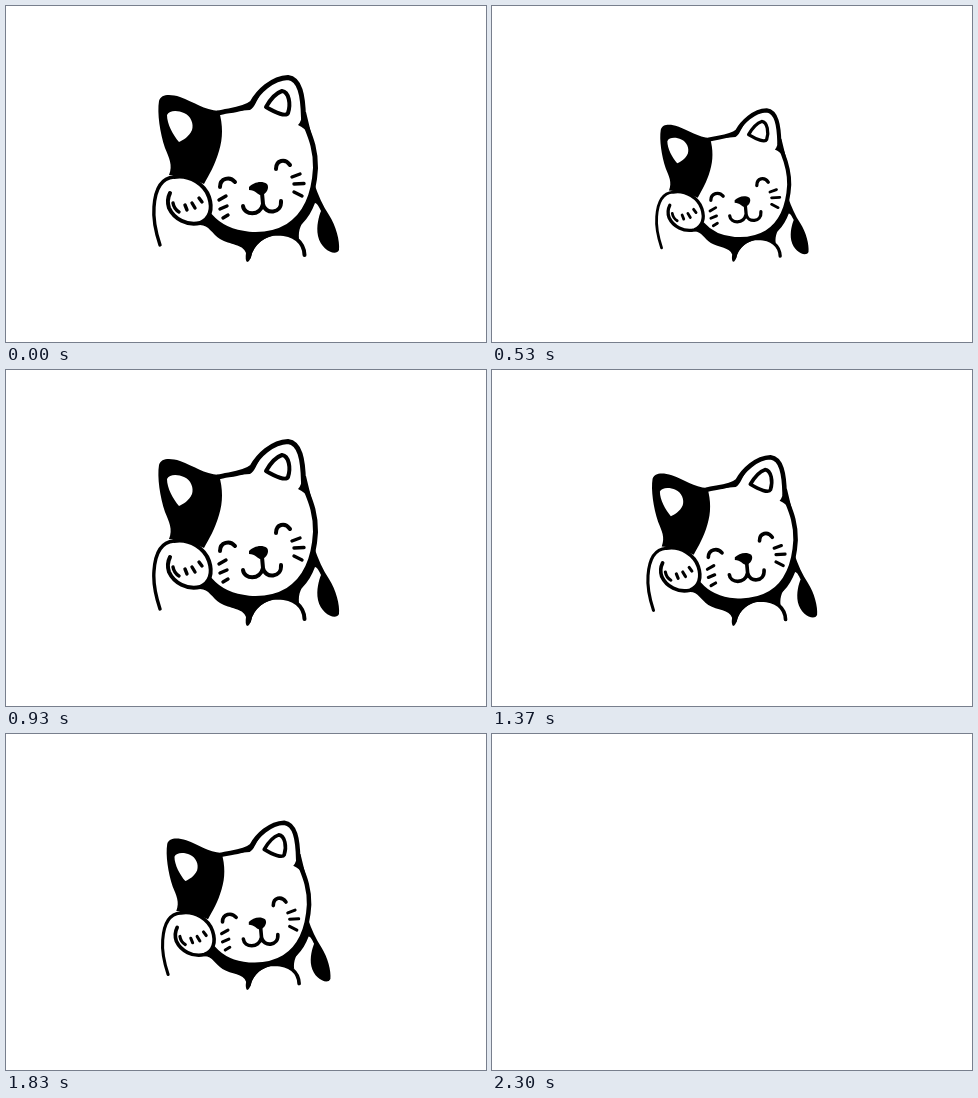
Animation of 480x336 px, one loop 2330 ms. Source, as an HTML page:

```html
<!DOCTYPE html>
<html lang="en">
<head>
<meta charset="utf-8">
<title>Waving cat</title>
<style>
  html, body { margin: 0; width: 100%; height: 100%; overflow: hidden; background: #fff; }
  svg { display: block; width: 100%; height: 100%; }
  .line { fill: none; stroke: #000; stroke-width: 4; stroke-linecap: round; stroke-linejoin: round; }
  .bold { stroke-width: 5; }
  .thin { stroke-width: 3.4; }
  .white { fill: #fff; }
</style>
</head>
<body>
<svg viewBox="0 0 480 336">
  <g id="cat">
    <!-- head and right ear -->
    <path class="line bold" d="M212 107C224 104 238 104 246 97C252 86 266 72 282 71.5C294 73 297 89 297.500 112C300 123 310 137 309.500 162C308 190 298 210 282 220C262 232 224 233 204 210"/>
    <path d="M230 105L246 96L255 88C250 95 249 101 244 104Z"/>
    <path d="M296 106L300 106L306 131C301 125 297 121 292 119Q296 115 296 106Z"/>
    <path class="line" d="M260 101C264 94 270 87 276 85C283 86 285 98 282 107C280 111 270 107 260 101Z"/>

    <!-- dark patch with left ear -->
    <path d="M163 169C167 159 163 152 159 142C154 127 151 107 153 95C155 88 164 88 174 91C188 96 198 104 213 105C217 119 217 132 213 145C209 159 203 169 198 178L182 171Z"/>
    <path class="white" d="M161 109C163 104 172 104 178 107C185 110 188 118 186 124C183 131 177 134 173 136C167 129 161 118 161 109Z"/>

    <!-- raised arm and paw -->
    <path class="line thin" d="M154 239C150 227 147 213 148 201C149 186 154 172 168 171"/>
    <path class="line white" style="fill:#fff" d="M168 171C184 168 199 179 203 191C207 203 204 213 194 217C181 220 168 213 163 202C161 196 162 191 164 187"/>
    <path class="line thin" d="M167 197Q168 203 173 206M179 199L181 204M186 197L189 202M193 192L196 196"/>

    <!-- collar, belly and tail -->
    <path d="M194 217L205 210C216 224 233 229 251 229C266 229 282 222 298 207L302 209C295 217 292 224 293 233C272 224 254 230 246 247Q244 256 241 256Q239 254 240 247C237 238 224 239 214 233C206 228 203 219 194 219Z"/>
    <path class="line" d="M243 251C246 236 259 227.500 272 227.500C288 228 298 236 298.500 249"/>
    <path d="M308 177C312 189 317 200 323 209C330 220 334 235 333 244C330 251 315 244 312 230C310 220 313 210 315 205C313 201 311 197 309 197C306 205 302 212 296 218L286 224L300 202Z"/>

    <!-- face -->
    <path class="line" d="M214 181C214 172 224 170 229 176M270 163C270 154 279 152 284 159"/>
    <path d="M243 181C247 177 255 174 261 178C264 182 260 188 256 189C252 190 250 184 243 184Z"/>
    <path class="line" d="M256 187L257 198M237 200C238 209 254 211 257 198C259 209 276 208 275 195"/>
    <path class="line thin" d="M286 171L294 168M288 178L298 177.500M288 186L296 190M213 194L220 190M214 203L221 200M217 212L222 209"/>
  </g>
</svg>
<script>
  const LOOP = 2330, BLANK_AT = 2300, SHRINK = 0.18;
  const DOWN = 525, UP = 400, UP_DELAY = 500;
  const cat = document.getElementById('cat');

  // cubic-bezier(0, 0, .58, 1), solved by bisection
  function easeOut(x) {
    if (x <= 0) return 0;
    if (x >= 1) return 1;
    let lo = 0, hi = 1;
    for (let i = 0; i < 20; i++) {
      const u = (lo + hi) / 2;
      if (1.74 * u * u - 0.74 * u ** 3 < x) lo = u; else hi = u;
    }
    return lo * lo * (3 - 2 * lo);
  }

  function squash(t) {
    const s = t - (t < 1200 ? 30 : 1200);
    return s < UP_DELAY ? easeOut(s / DOWN) : 1 - easeOut((s - UP_DELAY) / UP);
  }

  function draw() {
    const t = performance.now() % LOOP;
    const scale = 1 - SHRINK * squash(t);
    cat.setAttribute('transform', `translate(241 255) scale(${scale}) translate(-241 -255)`);
    cat.setAttribute('visibility', t < BLANK_AT ? 'visible' : 'hidden');
    requestAnimationFrame(draw);
  }
  draw();
</script>
</body>
</html>
```
